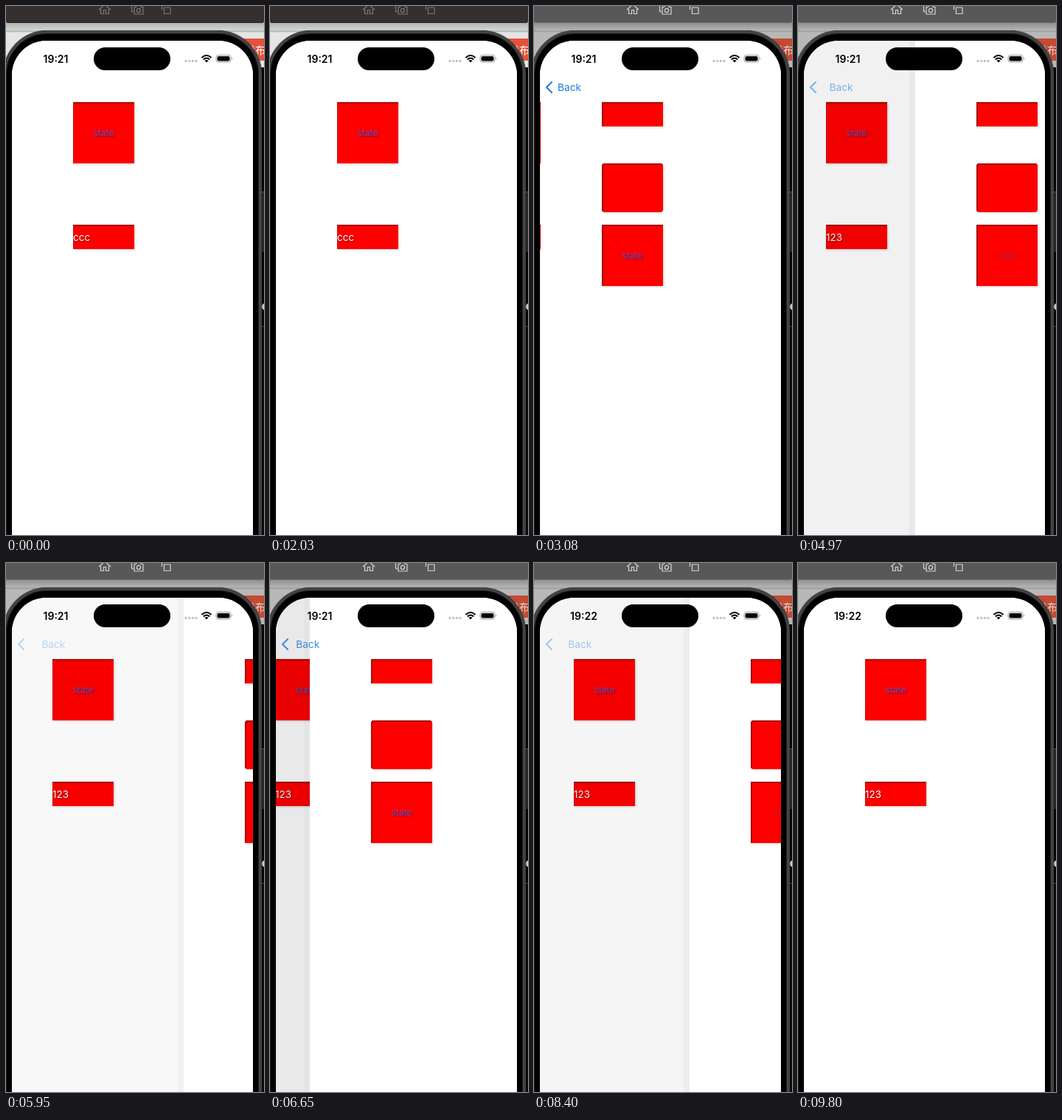
An HTML page that plays this animation: 350 by 716 pixels, repeating every 9.87 s.

```html
<!DOCTYPE html>
<html lang="en">
<head>
<meta charset="utf-8">
<style>
html, body { margin: 0; width: 100%; height: 100%; overflow: hidden; }
body { position: relative; background: #000; font-family: Inter, Roboto, sans-serif; }
div, svg { position: absolute; box-sizing: border-box; }
#desk { left: 0; top: 0; width: 350px; height: 83px; background: linear-gradient(#aeb1af 22px, #d4d6d4 33px, #aaa 34px, #e4e5e4 36px); }
.active #desk { background: linear-gradient(#8c8c8c 22px, #b5b5b5 33px, #999 34px, #b8b8b8 36px); }
#publish { left: 310px; top: 44px; width: 50px; height: 30px; background: #e2553a; color: #fff; font: 14px/30px "Noto Sans CJK SC", "Noto Sans CJK", sans-serif; padding-left: 14px; white-space: nowrap; }
.active #publish { background: #c44a33; color: #ddd; }
#side { left: 347px; top: 83px; width: 3px; height: 633px; background: linear-gradient(#050505 168px, #555 168px, #252525 170px, #252525 250px, #050505 250px, #050505 350px, #444 350px, #0a0a0a 352px); }
#knob { left: 347px; top: 402px; width: 10px; height: 10px; border-radius: 5px; background: #c8c8c8; }
#bar { left: 0; top: 0; width: 350px; height: 23px; background: #352f30; border-bottom: 1px solid #262223; border-radius: 0 0 3px 3px; color: #7d7879; }
.active #bar { background: #595757; border-color: #6b6969; color: #d6d5d5; }
#phone { left: -4px; top: 33px; width: 351px; height: 760px; border-radius: 60px; background: #000; border: 4px solid #424345; box-shadow: inset 0 0 0 1px #1b1b1c, 0 0 1px #000; }
#screen { left: 8px; top: 47px; width: 327px; height: 720px; border-radius: 47px; overflow: hidden; background: #fff; }
.page { left: 0; top: 0; width: 327px; height: 720px; background: #fff; }
.box { left: 83px; width: 83px; background: #f00; color: #6c4fc4; font-size: 12px; text-align: center; box-shadow: inset 0 3px 1px -1px #a8100c, inset 1px 0 1px #c00b08, 1px 1px 3px #0003; text-shadow: 1px 1px 2px #0008; }
#detail .box { box-shadow: inset 2px 2px 1px #a5120e, 1px 1px 3px #0003; }
#value { color: #fff; font-size: 13.5px; text-align: left; }
#dim { left: 0; top: 0; width: 327px; height: 720px; background: #000; }
#edge { left: -8px; top: 0; width: 8px; height: 720px; background: rgba(0,0,0,.035); }
#nav { left: 0; top: 47px; width: 100px; height: 32px; color: #1b7ade; }
#back { left: 24px; top: 0; font-size: 13.7px; line-height: 32px; }
#clock { left: 37px; top: 64px; width: 61px; text-align: center; font-size: 14px; line-height: 16px; font-weight: 600; color: #000; }
#island { left: 119px; top: 56px; width: 104px; height: 31px; border-radius: 16px; background: #000; }
</style>
</head>
<body>
<div id="desk"></div>
<div id="publish">发布</div>
<div id="side"></div>
<div id="knob"></div>
<div id="bar">
  <svg width="350" height="22" fill="none" stroke="currentColor" stroke-width="1.2">
    <path d="M126 5L134 -2L142 5M128.500 4V10.500H132.500V5.500H135.500V10.500H139.500V4"/>
    <path d="M170.500 -1V6Q170.500 8 173 8M174 1.500H176L177.500 -.5H182L183.500 1.500H186V11H174Z"/>
    <circle cx="180" cy="6" r="2.600"/>
    <path d="M214.500 2H223V10.500H214.500ZM211.500 5V1Q211.500 -1 214 -1"/>
  </svg>
</div>
<div id="phone"></div>
<div id="screen">
  <div class="page" id="home">
    <div class="box" style="top:83px;height:83px;line-height:83px">state</div>
    <div class="box" id="value" style="top:249px;height:33px;line-height:34px"></div>
  </div>
  <div id="dim"></div>
  <div class="page" id="detail">
    <div id="edge"></div>
    <div class="box" style="top:83px;height:33px"></div>
    <div class="box" style="top:166px;height:66px;border-radius:4px"></div>
    <div class="box" style="top:249px;height:83px;line-height:83px"><span id="label">state</span></div>
  </div>
  <div id="nav">
    <svg width="24" height="32" fill="none" stroke="currentColor" stroke-width="2" stroke-linecap="round" stroke-linejoin="round"><path d="M16 9L9 16L16 23"/></svg>
    <div id="back">Back</div>
  </div>
</div>
<div id="clock"></div>
<div id="island"></div>
<svg width="350" height="90" style="left:0;top:0">
  <g fill="#c4c4c4"><circle cx="244" cy="74.500" r="1.700"/><circle cx="248.700" cy="74.500" r="1.700"/><circle cx="253.400" cy="74.500" r="1.700"/><circle cx="258" cy="74.500" r="1.700"/></g>
  <g fill="none" stroke="#000" stroke-width="2"><path d="M265.500 70Q272 63.500 278.500 70M267.800 72.500Q272 68.500 276.200 72.500"/></g>
  <path d="M269.500 74Q272 72 274.500 74L272 76.500Z"/>
  <rect x="285" y="66.500" width="20" height="9.500" rx="3" fill="none" stroke="#999"/>
  <rect x="286.500" y="68" width="17" height="6.500" rx="2"/>
  <path d="M306.500 69.500Q308.500 71 306.500 73Z" fill="#999"/>
</svg>
<script>
const LOOP = 9870, WIDTH = 327, PARALLAX = 98;
const $ = id => document.getElementById(id);

const settle = ms => { const x = Math.max(0, ms) * .016; return (1 + x) * Math.exp(-x); };
const ease = (t, from, to) => {
  const u = Math.min(1, Math.max(0, (t - from) / (to - from)));
  return u * u * (3 - 2 * u);
};

// 0: detail page fully shown, 1: home page fully shown
function reveal(t) {
  if (t < 4560) return settle(t - 2550);
  if (t < 8270) return .79 * (ease(t, 4560, 5300) - ease(t, 5700, 7000));
  return 1 - settle(t - 8270);
}

function draw(now) {
  const t = now % LOOP, p = reveal(t);
  document.body.className = t >= 2450 ? "active" : "";
  $("clock").textContent = t < 8300 ? "19:21" : "19:22";
  $("value").textContent = t < 3300 ? "ccc" : "123";
  $("home").style.transform = `translateX(${Math.round(-PARALLAX * (1 - p))}px)`;
  $("detail").style.transform = `translateX(${Math.round(WIDTH * p)}px)`;
  $("dim").style.opacity = .1 * (1 - p);
  $("edge").style.opacity = Math.sin(Math.PI * p);
  $("label").style.opacity = 1 - 2 * Math.min(.4, Math.max(0, p - .14));
  $("nav").style.opacity = p > .995 ? 0 : 1 - p;
  $("back").style.transform = `translateX(${23 * p}px)`;
  requestAnimationFrame(() => draw(performance.now()));
}
draw(performance.now());
</script>
</body>
</html>
```
